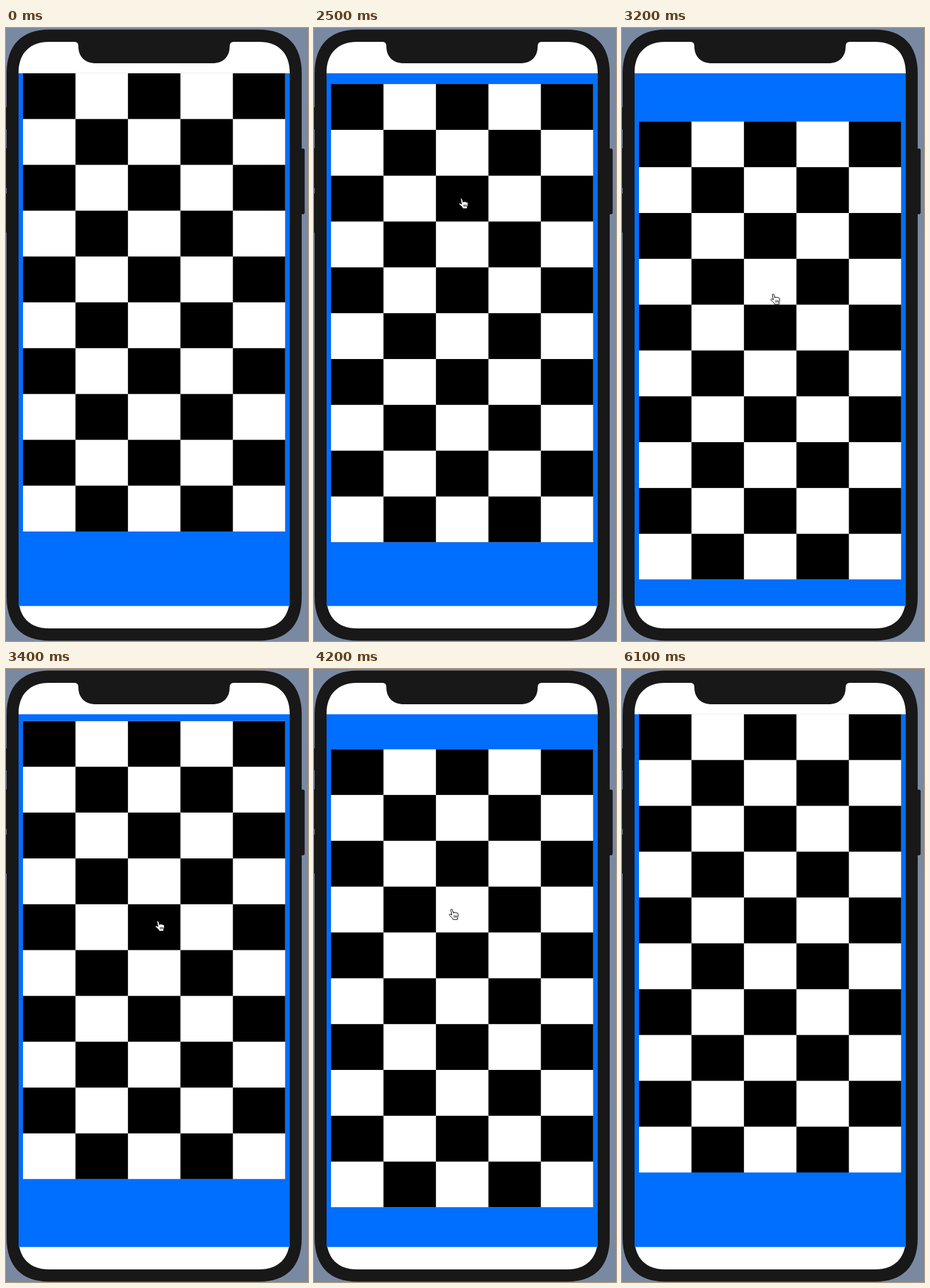
These frames come from a looping animation (480x974 px, 6.5 s). An HTML page:

```html
<!DOCTYPE html>
<html lang="en">
<head>
<meta charset="utf-8">
<title>Overscroll</title>
<style>
html, body { margin: 0; width: 100%; height: 100%; overflow: hidden; background: #7a89a2; }
svg { display: block; width: 100%; height: 100%; }
</style>
</head>
<body>
<svg viewBox="0 0 480 974">
  <defs>
    <pattern id="cells" width="166.8" height="145.64" patternUnits="userSpaceOnUse">
      <rect width="166.8" height="145.64" fill="#fff"/>
      <path d="M0 0H83.4V72.82H0ZM83.4 72.82H166.8V145.64H83.4Z"/>
    </pattern>
    <clipPath id="view"><rect x="20" y="71.8" width="431" height="846.7"/></clipPath>
  </defs>
  <g fill="#181818">
    <path d="M0 126h2v35H0ZM0 191h2v63H0ZM0 263h2v62H0Z"/>
    <rect x="465" y="191.5" width="9.7" height="104.5" rx="3"/>
    <path d="M1 72C1 27 25 2.500 69 2.500H402C446 2.500 470 27 470 72V904C470 949 446 973.500 402 973.500H69C25 973.500 1 949 1 904Z"/>
  </g>
  <path fill="#fff" d="M20 71C20 40 38 22 69 22H109Q115 22 115 29C115 46 126 56 143 56H328C345 56 355.500 46 355.500 29Q355.500 22 362 22H402C433 22 451 40 451 71V905C451 936 433 954 402 954H69C38 954 20 936 20 905Z"/>
  <g clip-path="url(#view)">
    <rect x="20" y="71.8" width="431" height="847" fill="#006eff"/>
    <g id="board"><rect width="417" height="728.2" fill="url(#cells)"/></g>
  </g>
  <path id="arrow" d="M0 0V15L3.600 11.800L6 17.500L8.400 16.500L6 11H10.500Z" fill="#000" stroke="#fff"/>
  <g id="hand" fill="#fff" stroke="#000" stroke-linejoin="round">
    <path d="M3 2C2.600 .5 5 0 5.500 1.800L7.200 7C7.200 5 9.300 5 9.700 6.600C10 5.400 12 5.600 12.200 7.200C12.700 6.200 14.500 6.600 14.600 8.400C14.800 10.500 14.600 12 13.800 13.500L13.500 17H6.500C6 15 4 13 1.500 11C-.3 9.600 .8 8 2.400 8.600L4.500 9.800Z"/>
    <path d="M8.300 10.500V14M10.300 10.500V14M12.300 10.500V14" stroke-width=".9"/>
  </g>
</svg>
<script>
const LOOP = 6500, STEP = 100, TOP = 71.8;
const [board, arrow, hand] = ['board', 'arrow', 'hand'].map(id => document.getElementById(id));

// Pointer path: time, x, y
const path = [
  [900, 446, 956], [1000, 335, 560], [1100, 258, 300], [1200, 231, 230], [1700, 231, 230],
  [1800, 227, 226], [2100, 229, 238], [2400, 229, 238], [2500, 230, 270], [2700, 232, 393.5],
  [2800, 234, 415], [3100, 236, 426], [3200, 236, 422], [3400, 237, 399.5], [3800, 211, 273],
  [3900, 212, 304], [4000, 213, 340], [4200, 214.5, 381], [4900, 214.5, 381],
  [5000, 214.5, 380], [5100, 214.5, 371.5], [5600, 209, -1]
];

// Drags: press time, release time, press y, last y
const drags = [[2400, 3150, 238, 426], [3800, 5050, 273, 381]];

function pointer(t) {
  const i = Math.max(1, path.findIndex(p => p[0] >= t));
  const [t0, x0, y0] = path[i - 1], [t1, x1, y1] = path[i];
  const k = (t - t0) / (t1 - t0);
  return [x0 + (x1 - x0) * k, y0 + (y1 - y0) * k];
}

// Rubber-band resistance past the scroll edge
const band = d => 0.55 * d / (1 + 0.55 * d / 847);

function offset(t) {
  const drag = drags.filter(d => t >= d[0]).pop();
  if (!drag) return 0;
  const [, release, from, to] = drag;
  if (t < release) return band(pointer(t)[1] - from);
  const k = (t - release) * 0.0148;
  return band(to - from) * (1 + k) * Math.exp(-k);
}

function place(el, x, y) {
  el.setAttribute('transform', `translate(${x} ${y})`);
}

function draw(now) {
  const t = Math.floor(now % LOOP / STEP) * STEP;
  const shown = t >= 900 && t < 5700;
  place(board, 27, TOP + (shown ? offset(t) : 0));
  arrow.style.display = shown && t < 1800 ? '' : 'none';
  hand.style.display = shown && t >= 1800 ? '' : 'none';
  if (shown) place(t < 1800 ? arrow : hand, ...pointer(t));
}

const start = performance.now();
function tick() {
  draw(performance.now() - start);
  requestAnimationFrame(tick);
}
tick();
</script>
</body>
</html>
```
